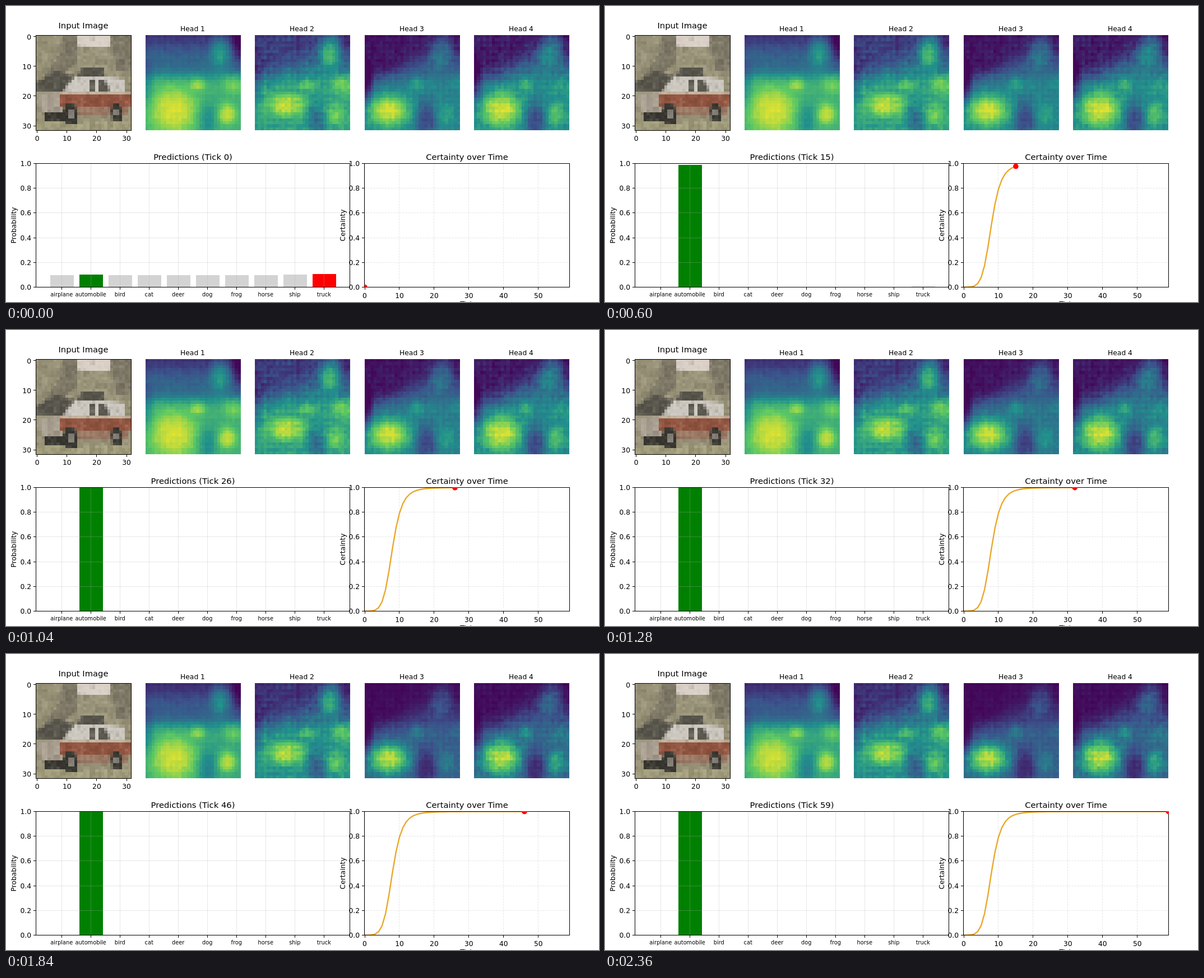
Recreate the animation shown at these times as an HTML page with a canvas. Size 1058 by 529 pixels, loop 2.4 s.

```html
<!DOCTYPE html>
<html lang="en">
<head>
<meta charset="utf-8">
<title>Predictions and certainty</title>
<style>
  html, body { margin: 0; width: 100%; height: 100%; overflow: hidden; background: #fff; }
  canvas { display: block; }
</style>
</head>
<body>
<canvas id="stage" width="1058" height="529"></canvas>
<script>
const ctx = document.getElementById('stage').getContext('2d');
const N = 32, SIZE = 170, TICKS = 60, TICK_MS = 40;
const TOP = 281.5, BOTTOM = 502.5, LEFT = [53.5, 613.5], RIGHT = [639.5, 1005.5];
const SMALL = 9.8, NORMAL = 12.3, LARGE = 14.75;
const VIRIDIS = [[68, 1, 84], [59, 82, 139], [33, 145, 140], [94, 201, 98], [253, 231, 37]];

// Name and how fast its log-probability grows; the second one is the true class
const CLASSES = [['airplane', -1.2], ['automobile', 1.67], ['bird', -.92], ['cat', -1.14], ['deer', -1.23],
  ['dog', -1.27], ['frog', -1.43], ['horse', -1.66], ['ship', -.26], ['truck', .46]];
const TRUE_CLASS = 1, FIRST_GUESS = 9;

// Regions every head looks at: x, y, radius x, radius y
const SPOTS = [[24.5, 5, 2.5, 4], [17, 16, 2, 1.6], [29, 16, 2.5, 2.5], [27, 26, 2.5, 2.8],
  [20, 28, 2.6, 5], [32, 2, 2.5, 6], [0, 16, 1.5, 6]];

// Base levels, a sloping edge, the main blob and one weight for each shared region
const HEADS = [
  { floor: .12, rise: .22, row: 3, slope: 0, lower: .29, fade: .22, texture: .03,
    blob: [9, 25, 6.5, 6.5, .31], weights: [.24, .2, .17, .28, -.16, -.25, -.12] },
  { floor: .18, rise: .22, row: 8, slope: .4, lower: .17, fade: .26, texture: .07,
    blob: [10, 23, 5, 3, .34], weights: [.36, .15, .22, .2, -.2, -.2, -.15] },
  { floor: .06, rise: .25, row: 8.5, slope: .6, lower: .13, fade: .6, texture: .05,
    blob: [7.5, 25, 5.5, 4.2, .48], weights: [.13, .13, .03, .12, -.22, -.2, -.25] },
  { floor: .08, rise: .27, row: 8, slope: .6, lower: .14, fade: .6, texture: .06,
    blob: [8.5, 24.5, 5, 4.4, .46], weights: [.18, .14, .07, .22, -.25, -.25, -.2] }
];

const clamp = (v, lo = 0, hi = 1) => Math.min(hi, Math.max(lo, v));
const sigmoid = v => 1 / (1 + Math.exp(-v));
const noise = (x, y, seed) => {
  const n = Math.sin(x * 12.99 + y * 78.23 + seed * 37.7) * 43758.5;
  return n - Math.floor(n) - .5;
};
const snap = v => Math.floor(v) + .5;
const yOf = p => BOTTOM - p * (BOTTOM - TOP);
const xOf = tick => 640 + tick * 6.195;
const classX = i => 99.7 + i * 52.01;
const panelX = i => Math.round(53.3 + i * 195.45);

function certainty(tick) {
  const u = tick - 7.95;
  return sigmoid(.72 * u / (1 + .05 * u));
}

function makeGrid() {
  const c = document.createElement('canvas');
  c.width = c.height = N;
  return c;
}

function eachCell(fn) {
  for (let y = 0; y < N; y++) for (let x = 0; x < N; x++) fn(x, y);
}

// A car in front of trees, in flat shapes on a coarse grid
function makePhoto() {
  const grid = makeGrid(), g = grid.getContext('2d');
  const shape = (colour, path) => {
    g.fillStyle = colour;
    g.fill(new Path2D(path));
  };
  shape('#999379', 'M0 0H32V32H0Z');
  shape('#7d7766', 'M9 0H14V9L8 14H3L8 7ZM25 0H32V12H27Z');
  shape('#d9cfc6', 'M14 0H25V4H14Z');
  shape('#56534a', 'M0 16L7 12L14 14L15 11H23V14L9 19H0Z');
  shape('#cdc9c1', 'M9 19L13 14H24L30 15V19Z');
  shape('#5f5d54', 'M18 15H20V19H18ZM21 15H23L25 19H21Z');
  shape('#aaa092', 'M1 20L9 19V26H2Z');
  shape('#c3b29d', 'M8 19H32V20H8Z');
  shape('#935541', 'M8 20H32V24H8Z');
  shape('#997763', 'M14 24H31V27H14Z');
  shape('#a29d7b', 'M0 29H32V32H0Z');
  shape('#37352f', 'M3 26H14V29H3ZM10 23H13L14 25V30H10L9 26ZM26 23H28L29 25V29H26L25 26Z');
  shape('#858077', 'M11 25H13V28H11ZM26 25H28V27H26Z');
  eachCell((x, y) => {
    const n = noise(x, y, 9) + noise(x >> 1, y >> 1, 4);
    g.fillStyle = `rgba(${n > 0 ? '255,250,225' : '20,18,14'},${Math.abs(n) * .14})`;
    g.fillRect(x, y, 1, 1);
  });
  return grid;
}

function bump(x, y, [cx, cy, rx, ry]) {
  const d = ((x - cx) / rx) ** 2 + ((y - cy) / ry) ** 2;
  return Math.exp(-(d ** 1.3) / 2);
}

HEADS.forEach((head, seed) => {
  head.grid = makeGrid();
  head.values = [];
  eachCell((x, y) => {
    let v = head.floor + head.rise * sigmoid((y - head.row + head.slope * (x - 16)) / 2)
      + head.lower * sigmoid((y - 13) / 1.1) + head.blob[4] * bump(x, y, head.blob);
    SPOTS.forEach((spot, i) => v += head.weights[i] * bump(x, y, spot));
    v += head.texture * (noise(x, y, seed) + noise(x >> 1, y >> 1, seed + 5) + (x % 2 + y % 2 - 1) * .4);
    head.values.push(clamp(v, .02, .98));
  });
});

function viridis(v) {
  const p = clamp(v) * 4, i = Math.min(3, Math.floor(p));
  return VIRIDIS[i].map((a, k) => a + (VIRIDIS[i + 1][k] - a) * (p - i));
}

function drawHead(head, i, tick) {
  const u = clamp((tick - 20) / 30), fade = head.fade * u * u * (3 - 2 * u);
  const g = head.grid.getContext('2d'), img = g.createImageData(N, N), x = panelX(i + 1);
  head.values.forEach((v, k) => img.data.set([...viridis(v * (1 - fade * (1 - v))), 255], k * 4));
  g.putImageData(img, 0, 0);
  ctx.drawImage(head.grid, x, 52, SIZE, SIZE);
  text(`Head ${i + 1}`, x + SIZE / 2 - 1, 45);
}

function text(s, x, y, size = NORMAL, align = 'center') {
  ctx.font = `${size}px "DejaVu Sans", sans-serif`;
  ctx.textAlign = align;
  ctx.fillStyle = '#000';
  ctx.fillText(s, x, y);
}

function sideText(s, x) {
  ctx.save();
  ctx.translate(x, 392);
  ctx.rotate(-Math.PI / 2);
  text(s, 0, 0);
  ctx.restore();
}

function line(x1, y1, x2, y2, colour = '#000') {
  ctx.strokeStyle = colour;
  ctx.lineWidth = 1;
  ctx.beginPath();
  ctx.moveTo(x1, y1);
  ctx.lineTo(x2, y2);
  ctx.stroke();
}

function gridLines([x1, x2], xs, dash) {
  const colour = 'rgba(176,176,176,.3)';
  ctx.setLineDash(dash);
  for (const x of xs) line(snap(x), BOTTOM, snap(x), TOP, colour);
  for (let i = 0; i <= 5; i++) line(x1, snap(yOf(i / 5)), x2, snap(yOf(i / 5)), colour);
  ctx.setLineDash([]);
}

function frame([x1, x2], xs) {
  ctx.strokeStyle = '#000';
  ctx.lineWidth = 1;
  ctx.strokeRect(x1, TOP, x2 - x1, BOTTOM - TOP);
  for (const x of xs) line(snap(x), BOTTOM, snap(x), BOTTOM + 4.5);
  for (let i = 0; i <= 5; i++) {
    const y = snap(yOf(i / 5));
    line(x1 - 4.5, y, x1, y);
    text((i / 5).toFixed(1), x1 - 8.5, y + 4.5, NORMAL, 'right');
  }
}

const photo = makePhoto();

function drawInput() {
  ctx.drawImage(photo, 53, 52, SIZE, SIZE);
  ctx.strokeStyle = '#000';
  ctx.lineWidth = 1;
  ctx.strokeRect(53.5, 52.5, SIZE, SIZE);
  for (let i = 0; i <= 30; i += 10) {
    const d = (i + .5) * SIZE / N;
    line(snap(53 + d), 222, snap(53 + d), 227);
    line(49, snap(52 + d), 53, snap(52 + d));
    text(i, 53 + d, 241);
    text(i, 45, 52 + d + 5, NORMAL, 'right');
  }
  text('Input Image', 138, 40, LARGE);
}

function probabilities(tick) {
  const s = tick <= 7 ? Math.sqrt(certainty(tick) / certainty(7)) : 1 + (tick - 7) * .37;
  const w = CLASSES.map(([, rate], i) => Math.exp(rate * s + (i === FIRST_GUESS ? .05 : 0)));
  const sum = w.reduce((a, b) => a + b);
  return w.map(v => v / sum);
}

function drawPredictions(tick) {
  const probs = probabilities(tick), best = probs.indexOf(Math.max(...probs));
  const xs = CLASSES.map((_, i) => classX(i));
  probs.forEach((p, i) => {
    const y = Math.round(yOf(p));
    ctx.fillStyle = i === TRUE_CLASS ? '#008000' : i === best ? '#f00' : '#d3d3d3';
    ctx.fillRect(Math.round(xs[i] - 20.8), y, 42, BOTTOM - y);
  });
  gridLines(LEFT, xs, []);
  frame(LEFT, xs);
  CLASSES.forEach(([name], i) => text(name, xs[i] - .5, 519, SMALL));
  text(`Predictions (Tick ${tick})`, 333.5, 274.5, LARGE);
  sideText('Probability', 17.5);
}

function insideChart(paint) {
  ctx.save();
  ctx.beginPath();
  ctx.rect(RIGHT[0], TOP - .5, RIGHT[1] - RIGHT[0] + .5, BOTTOM - TOP + .5);
  ctx.clip();
  ctx.beginPath();
  paint();
  ctx.restore();
}

function drawCertainty(tick) {
  const labels = [0, 10, 20, 30, 40, 50], xs = labels.map(xOf);
  gridLines(RIGHT, xs, [3.6, 1.6]);
  insideChart(() => {
    for (let t = 0; t <= tick; t++) ctx.lineTo(xOf(t), yOf(certainty(t)));
    ctx.strokeStyle = '#eba82c';
    ctx.lineWidth = 2.4;
    ctx.lineJoin = 'round';
    ctx.stroke();
  });
  frame(RIGHT, xs);
  insideChart(() => {
    ctx.arc(xOf(tick), yOf(certainty(tick)), 4.8, 0, 7);
    ctx.fillStyle = '#f00';
    ctx.fill();
  });
  labels.forEach((n, i) => text(n, xs[i], 521.5));
  text('Certainty over Time', 822.5, 274.5, LARGE);
  text('Tick', 822.5, 537.4);
  sideText('Certainty', 604.5);
}

function draw() {
  const tick = Math.floor(performance.now() / TICK_MS) % TICKS;
  ctx.fillStyle = '#fff';
  ctx.fillRect(0, 0, 1058, 529);
  ctx.imageSmoothingEnabled = false;
  drawInput();
  HEADS.forEach((head, i) => drawHead(head, i, tick));
  drawPredictions(tick);
  drawCertainty(tick);
  requestAnimationFrame(draw);
}
draw();
</script>
</body>
</html>
```
